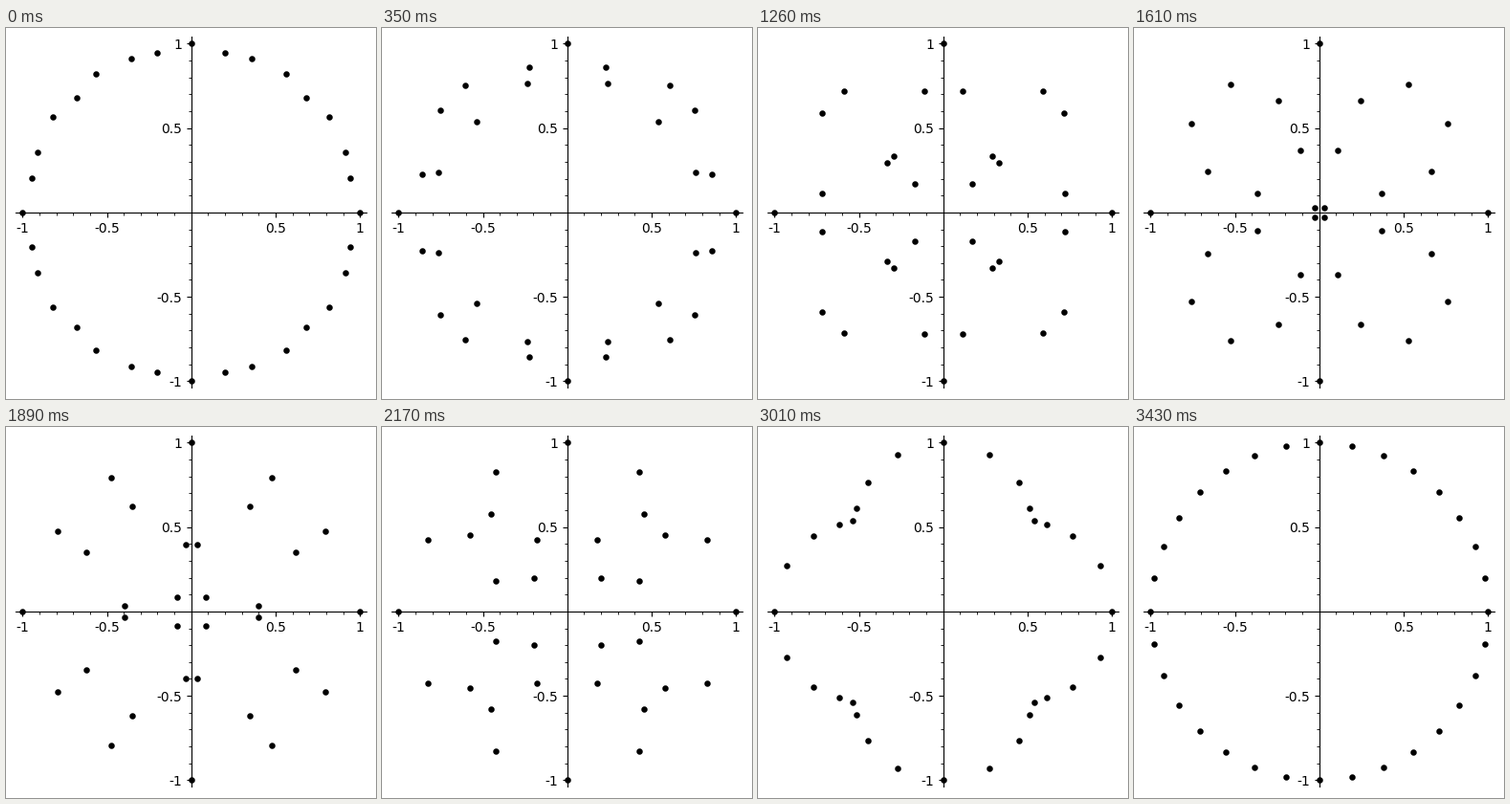
Animation, 387 px wide and 388 px high, one loop 3500 ms. Source, as a matplotlib script:

```python
import numpy as np
import matplotlib.pyplot as plt
from matplotlib.animation import FuncAnimation
from matplotlib.ticker import MultipleLocator

WIDTH, HEIGHT, DPI = 387, 388, 100
CENTER_X, CENTER_Y = 193.77, 192.88   # origin, in pixels from the top left
UNIT, LIMIT = 176.45, 1.04            # pixels per unit, half range of the axes
ORDER, POWER = 32, 13
FRAMES, INTERVAL = 50, 70

plt.rcParams["font.family"] = "DejaVu Sans"
plt.rcParams["font.size"] = 10

roots = np.exp(2j * np.pi * np.arange(ORDER) / ORDER)
targets = roots ** POWER


def positions(frame):
    """Blend every root of unity linearly into its power."""
    t = (frame + 1) / FRAMES
    z = (1 - t) * roots + t * targets
    return np.column_stack([z.real, z.imag])


fig = plt.figure(figsize=(WIDTH / DPI, HEIGHT / DPI), dpi=DPI, facecolor="white")
half = UNIT * LIMIT
ax = fig.add_axes([(CENTER_X - half) / WIDTH, 1 - (CENTER_Y + half) / HEIGHT,
                   2 * half / WIDTH, 2 * half / HEIGHT])
ax.set(xlim=(-LIMIT, LIMIT), ylim=(-LIMIT, LIMIT))

for side in ("top", "right"):
    ax.spines[side].set_visible(False)
for side in ("left", "bottom"):
    ax.spines[side].set_position("zero")

ticks = [-1, -0.5, 0.5, 1]
labels = [f"{v:g}" for v in ticks]
ax.set_xticks(ticks, labels)
ax.set_yticks(ticks, labels)
for axis in (ax.xaxis, ax.yaxis):
    axis.set_minor_locator(MultipleLocator(0.1))

dots = ax.scatter(*positions(0).T, s=10, color="black", linewidths=1.5, zorder=5)


def update(frame):
    dots.set_offsets(positions(frame))
    return (dots,)


animation = FuncAnimation(fig, update, frames=FRAMES, interval=INTERVAL,
                          repeat=True, repeat_delay=0)
plt.show()
```
